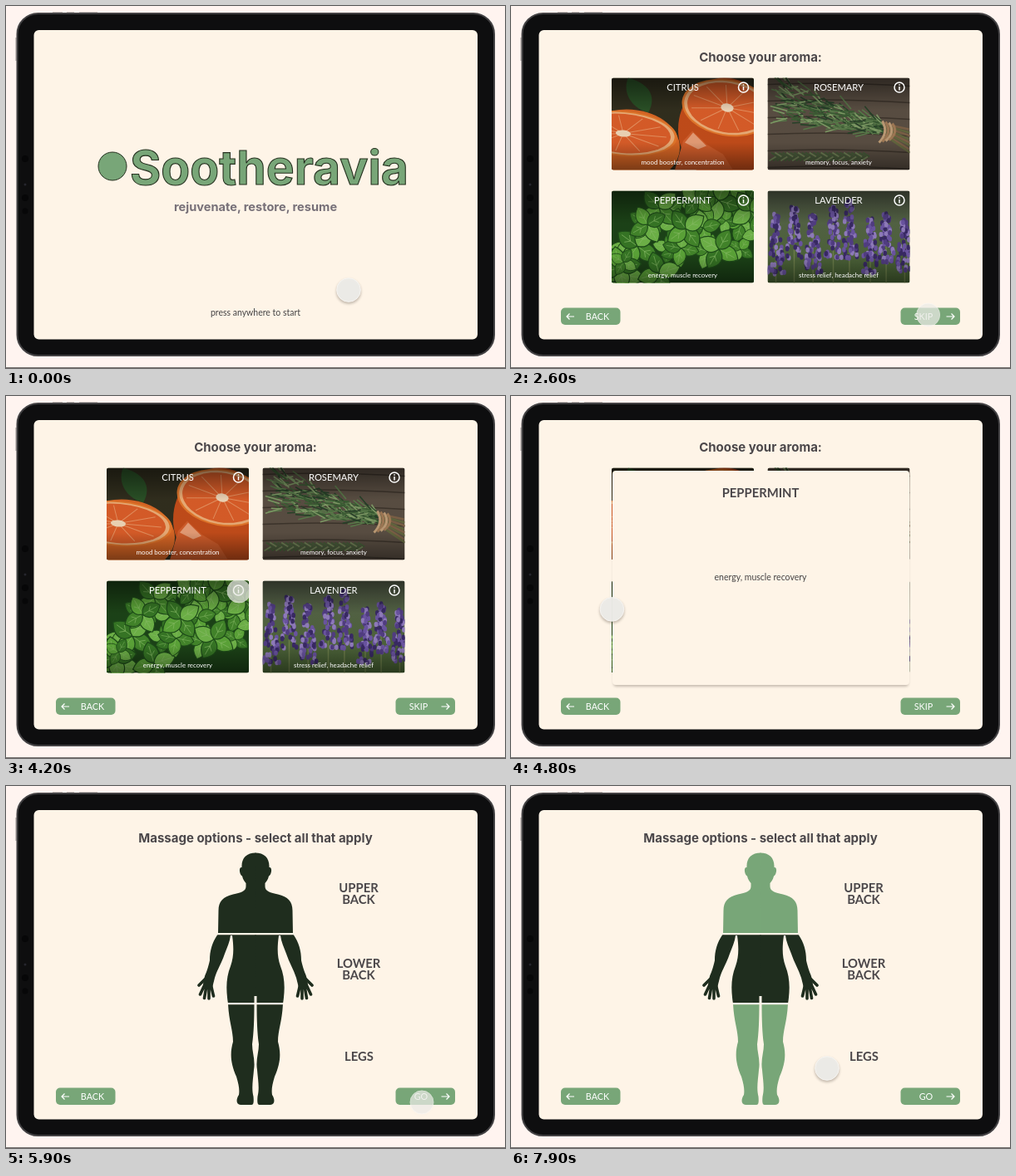
Animation, 600 px wide and 436 px high, one loop 8000 ms. Source, as an HTML page:

```html
<!DOCTYPE html>
<html lang="en">
<head>
<meta charset="utf-8">
<title>Nap pod tablet</title>
<style>
  html, body { margin: 0; width: 100%; height: 100%; overflow: hidden; background: #fff4f0; }
  svg { display: block; width: 100vw; height: 100vh; }
  text { font-family: Lato, "Open Sans", sans-serif; fill: #4b474a; }
  .title, .logo { font-family: Inter, Roboto, sans-serif; font-weight: 700; }
  .title { font-size: 15px; text-anchor: middle; }
  .tagline { font-size: 14.6px; fill: #777078; }
  .logo { font-size: 57px; fill: #78a678; stroke: #25301f; stroke-width: 1.1; }
  .body { font-size: 10.5px; fill: #454344; }
  .label { font-size: 14.8px; font-weight: 700; text-anchor: middle; }
  .light { fill: #fff; text-anchor: middle; }
  .icon { fill: none; stroke: #fef4e7; stroke-width: 2; stroke-linecap: round; stroke-linejoin: round; }
  .icon .solid { fill: #fef4e7; stroke: none; }
  .icon .cut { stroke: #78a678; stroke-width: 5; }
</style>
</head>
<body>
<svg id="stage" viewBox="0 0 600 436"></svg>
<script>
const LOOP = 8000;
const GREEN = '#78a678', DARK = '#1f2d1e', CREAM = '#fef4e7';

function seeded(seed) {
  return () => (seed = (seed * 16807) % 2147483647) / 2147483647;
}
const repeat = (n, draw) => Array.from({ length: n }, (_, i) => draw(i)).join('');
const fix = v => v.toFixed(1);

const text = (x, y, str, cls, size) =>
  `<text x="${x}" y="${y}" class="${cls}"${size ? ` font-size="${size}"` : ''}>${str}</text>`;
const lines = (x, y, rows, cls, step) =>
  rows.map((row, i) => text(x, y + i * step, row, cls)).join('');
const ellipse = (x, y, rx, ry, fill) =>
  `<ellipse cx="${fix(x)}" cy="${fix(y)}" rx="${fix(rx)}" ry="${fix(ry)}" fill="${fill}"/>`;

function button(x, label, labelX, forward) {
  const tip = forward ? 533 : 67, tail = forward ? 523.5 : 76, back = forward ? -3.5 : 3.5;
  return `<rect x="${x}" y="363.5" width="71.5" height="20.5" rx="5" fill="${GREEN}"/>
    ${text(labelX, 377.6, label, 'light', 10.8)}
    <path d="M${tail} 374H${tip}m${back} -3.5L${tip} 374l${back} 3.5" fill="none" stroke="#fff" stroke-width="1.2"/>`;
}
const backButton = button(60, 'BACK', 104, false);

// Photo stand-ins, each drawn in a 171 x 111 box
function slice(x, y, rx, ry, turn) {
  const rays = repeat(11, i => {
    const a = i * Math.PI * 2 / 11;
    return `M${x} ${y}L${fix(x + Math.cos(a) * rx * .8)} ${fix(y + Math.sin(a) * ry * .8)}`;
  });
  return `<g transform="rotate(${turn} ${x} ${y})">
    ${ellipse(x, y, rx, ry, '#ea7a2c')}${ellipse(x, y, rx * .95, ry * .94, '#f3b27a')}
    ${ellipse(x, y, rx * .88, ry * .87, '#e0602a')}
    <path d="${rays}" stroke="#ee9562" stroke-width="1"/>${ellipse(x, y, rx * .14, ry * .15, '#f7dcbc')}</g>`;
}

function citrus() {
  return `<rect width="171" height="111" fill="#33301f"/>
    <path d="M44 42C18 34 14 12 20 0C42 6 56 20 44 42Z" fill="#2c5428"/>
    ${ellipse(136, 62, 56, 62, '#c94f1b')}${ellipse(18, 84, 64, 46, '#e06a26')}
    ${slice(139, 36, 55, 34, 10)}${slice(14, 67, 65, 27, 5)}
    <path d="M76 111L86 76L97 64L114 80L134 92L146 111Z" fill="#d8602c"/>
    <path d="M88 78L98 66L114 82L104 86Z" fill="#eda27a"/>`;
}

function rosemary() {
  const rand = seeded(41);
  const planks = repeat(6, i => `<path d="M0 ${8 + i * 20}Q80 ${4 + i * 20} 171 ${10 + i * 20}" stroke="#3f362d" stroke-width="1.5" fill="none"/>`);
  const needles = repeat(260, () => {
    const d = rand(), spread = (rand() - .5) * (20 + 56 * d);
    const x = 142 - d * 122, y = 62 - d * 34 + spread * .7;
    const a = 3.5 + (rand() - .5) * 1.3, len = 10 + rand() * 12;
    const color = ['#29432a', '#3d5f35', '#5c7e4c', '#83a069'][Math.floor(rand() * 4)];
    return `<path d="M${fix(x)} ${fix(y)}l${fix(Math.cos(a) * len)} ${fix(Math.sin(a) * len)}" stroke="${color}" stroke-width="1.6"/>`;
  });
  const sprig = repeat(50, i =>
    `<path d="M${fix(10 + i * 2.3)} 95l-8 ${i % 2 ? -5 : 5}" stroke="${i % 3 ? '#456239' : '#718c58'}" stroke-width="1.5"/>`);
  const stems = repeat(8, i => `<path d="M142 ${56 + i * 2}L${170 + i % 3} ${62 + i * 4}" stroke="${i % 2 ? '#666a40' : '#806448'}" stroke-width="2.5"/>`);
  const twine = repeat(4, i => `<path d="M${134 + i * 4} ${78 - i}Q${146 + i * 4} 66 ${138 + i * 4} ${52 + i}" stroke="${i % 2 ? '#a57d58' : '#c3a079'}" stroke-width="3" fill="none"/>`);
  return `<rect width="171" height="111" fill="#5d5145"/>${planks}${sprig}${needles}${stems}${twine}`;
}

function peppermint() {
  const rand = seeded(97);
  const leaf = 'M0 0C4 -10 14 -11 22 0C14 10 4 10 0 0Z';
  const sprigs = repeat(30, i => {
    const x = (i * 47 + rand() * 24) % 178, y = 4 + rand() * 104, turn = rand() * 90;
    const scale = .8 + rand() * .55;
    const leaves = repeat(4, k => `<g transform="rotate(${k * 90})">
      <path d="${leaf}" fill="${['#458a2c', '#5faa3a', '#387a26', '#72b94a'][(k + i) % 4]}" stroke="#1f4f1a"/>
      <path d="M2 0H18M8 0l4 -4M8 0l4 4" fill="none" stroke="#8fc56c" stroke-width=".5"/></g>`);
    return `<g transform="translate(${fix(x)} ${fix(y)}) rotate(${fix(turn)}) scale(${fix(scale)})">${leaves}</g>`;
  });
  return `<rect width="171" height="111" fill="#1d4518"/>${sprigs}`;
}

function lavender() {
  const rand = seeded(13);
  const spikes = repeat(8, i => {
    const x = 10 + i * 22 + rand() * 4, top = 10 + rand() * 26, height = 58 + rand() * 18;
    const blooms = repeat(64, () => {
      const d = rand(), color = ['#3b2b68', '#554088', '#6f58a8', '#9681c4'][Math.floor(rand() * 4)];
      return ellipse(x + (rand() - .5) * (7 + 14 * d), top + d * height, 2.3, 3.2, color);
    });
    return `<path d="M${fix(x)} ${fix(top + 20)}V111" stroke="#71834e" stroke-width="1.5"/>${blooms}`;
  });
  return `<rect width="171" height="111" fill="url(#meadow)"/>${spikes}`;
}

function card(x, y, name, note, photo) {
  return `<g transform="translate(${x} ${y})"><g clip-path="url(#card)">${photo()}
    <rect width="171" height="111" fill="url(#shade)"/></g>
    ${text(85.5, 15.3, name, 'light', 11.2)}${text(85.5, 104, note, 'light', 7.9)}
    <circle cx="158.5" cy="11.5" r="6" fill="none" stroke="#fff" stroke-width="1.5"/>
    <path d="M158.5 10.6v4.4M158.5 7.7v1.6" stroke="#fff" stroke-width="1.5"/></g>`;
}

const badge = (x, y, art) =>
  `<g transform="translate(${x} ${y})"><circle r="24" fill="${GREEN}"/><g class="icon">${art}</g></g>`;
const slash = '<path class="cut" d="M-10 -13L13 10"/><path d="M-12 -11L11 12"/>';
const steam = repeat(3, i =>
  `<path d="M${i * 8 - 9} 12q-5 -5 0 -11t1 -12q6 6 2 12t-3 11Z" class="solid"/>`);

const icons = {
  voice: `<circle cx="-2" cy="-5" r="4"/><path d="M-11 11v-2q0 -5 9 -5t9 5v2ZM5 -8q3 4 0 7M9 -11q6 7 0 13"/>${slash}`,
  food: `<path d="M0 -6H12L10 11H6M5 -6V-11L9 -12M-11 3q0 -5 7 -5t7 5ZM-11 7H3M-11 11H3"/>${slash}`,
  phone: `<rect class="solid" x="-8" y="-13" width="16" height="27" rx="3"/>
    <rect x="-6" y="-9" width="12" height="17" fill="${GREEN}" stroke="none"/><circle cy="11" r="1.2" fill="${GREEN}" stroke="none"/>`,
  question: `<path d="M-10 -11H10V9H4L0 13L-4 9H-10ZM-3.5 -4q0 -4 3.5 -4t3.5 3.5q0 2 -2 3.2t-1.5 3.3M0 5v.2"/>`,
  pregnant: `<circle class="solid" cx="-1" cy="-12" r="3.4"/>
    <path class="solid" d="M-4 -7H1Q3 -6 3 -2Q7 0 6 5H2V15H-3V5H-6V-3Q-6 -7 -4 -7Z"/>`,
  scent: `${steam}<path class="cut" d="M-13 -8L14 9"/><path d="M-15 -7L14 11"/>`
};

const startPage = `
  <circle cx="128" cy="193" r="17" fill="${GREEN}" stroke="#25301f"/>
  ${text(149, 215, 'Sootheravia', 'logo')}
  ${text(300, 246.5, 'rejuvenate, restore, resume', 'title tagline')}
  <g text-anchor="middle">${text(300, 373, 'press anywhere to start', 'body')}</g>`;

const rulesPage = `
  ${text(300, 67.5, 'Things to consider beforehand', 'title')}
  ${text(300, 263, 'Disclaimer', 'title')}
  ${badge(146, 114.5, icons.voice)}${badge(332, 114.5, icons.food)}
  ${badge(146, 186.5, icons.phone)}${badge(331, 186.5, icons.question)}
  ${badge(146, 310, icons.pregnant)}${badge(332, 310, icons.scent)}
  ${lines(184, 105.5, ['Please show courtesy', 'and lower your voice.', 'People are napping.'], 'body', 11)}
  ${lines(370, 111, ['Do not bring food or', 'beverages in the pod.'], 'body', 11)}
  ${lines(184, 177.5, ['Please silence your', 'phone to avoid it', 'distracting others.'], 'body', 11)}
  ${lines(369.5, 183.5, ['For questions/problems:', 'support@dozes.example'], 'body', 11)}
  ${lines(184, 307, ['Use caution using the', 'pod if you are pregnant.'], 'body', 11)}
  ${lines(370, 301, ['Do not use the aroma setting', 'if you are sensitive/allergies to', 'essential oils or strong scents.'], 'body', 11)}
  ${backButton}${button(468.5, 'GO', 499, true)}`;

const infoPanel = `<g id="info">
  <rect x="123" y="93" width="355" height="257" rx="4" fill="#4a3d33" opacity=".3" filter="url(#soft)"/>
  <rect x="122" y="90" width="357" height="258" rx="4" fill="${CREAM}"/>
  ${text(300, 122, 'PEPPERMINT', 'label')}
  <g text-anchor="middle">${text(300, 222, 'energy, muscle recovery', 'body')}</g></g>`;

const aromaPage = `
  ${text(300, 67, 'Choose your aroma:', 'title')}
  ${card(121, 86.5, 'CITRUS', 'mood booster, concentration', citrus)}
  ${card(308.5, 86.5, 'ROSEMARY', 'memory, focus, anxiety', rosemary)}
  ${card(121, 222.5, 'PEPPERMINT', 'energy, muscle recovery', peppermint)}
  ${card(308.5, 222.5, 'LAVENDER', 'stress relief, headache relief', lavender)}
  ${backButton}${button(468.5, 'SKIP', 496, true)}${infoPanel}`;

const halfBody = `<g id="half">
  <path fill="currentColor" d="M300.5 80.5C289 80.5 283 87 283.5 98C279.5 97 280.5 107 284 108.5C285 113 287 115 288.5 117V121
    C288.5 127 282 128.5 273 130.5C261 133.5 255.5 139 255.5 150L255 178C248 188 245 198 245 210
    C243 219 241 224 239 229L237 239L248 243L251 231C254 221 260 212 263 202C266 194 269 188 270 180H272
    C274 195 274 206 270 217C265 230 264 243 267 262C268 284 273 294 273 308C269 322 270 334 277 350
    C280 360 281 366 280 372C276 378 277 384 282 384H295C298 384 298 380 297.5 374C295 364 297 354 298 342
    C300 330 296 321 296 311C298 298 298.5 280 298.5 262V253H300.5Z"/>
  <path fill="none" stroke="currentColor" stroke-width="3.6" stroke-linecap="round"
    d="M241 231L232 240M240 237L233.5 251M241.5 238L238.5 255.5M244 238L244 256M246 238L249.5 253"/></g>`;
const part = id => `<g id="${id}" clip-path="url(#${id}Clip)"><use href="#whole"/></g>`;

const massagePage = `
  ${text(300, 67.5, 'Massage options - select all that apply', 'title')}
  ${part('upper')}${part('middle')}${part('legs')}
  ${lines(424, 128, ['UPPER', 'BACK'], 'label', 14)}
  ${lines(424, 219, ['LOWER', 'BACK'], 'label', 14)}
  ${text(424.5, 330.5, 'LEGS', 'label')}
  ${backButton}${button(468.5, 'GO', 499, true)}`;

const pages = [startPage, rulesPage, aromaPage, massagePage];
const band = (id, y, h) => `<clipPath id="${id}Clip"><rect x="200" y="${y}" width="200" height="${h}"/></clipPath>`;

document.getElementById('stage').innerHTML = `
  <defs>
    <clipPath id="screen"><rect x="33.5" y="29" width="533.5" height="372.5" rx="6"/></clipPath>
    <clipPath id="card"><rect width="171" height="111" rx="2.5"/></clipPath>
    ${band('upper', 70, 107)}${band('middle', 179.3, 81.7)}${band('legs', 263.3, 130)}
    <linearGradient id="shade" x2="0" y2="1">
      <stop offset="0" stop-opacity=".5"/><stop offset=".35" stop-opacity=".06"/>
      <stop offset=".7" stop-opacity=".06"/><stop offset="1" stop-opacity=".45"/>
    </linearGradient>
    <linearGradient id="meadow" x2="0" y2="1">
      <stop offset="0" stop-color="#5c6650"/><stop offset="1" stop-color="#4b6735"/>
    </linearGradient>
    <filter id="soft" x="-50%" y="-50%" width="200%" height="200%"><feGaussianBlur stdDeviation="1.6"/></filter>
    ${halfBody}
    <g id="whole"><use href="#half"/><use href="#half" transform="translate(600) scale(-1 1)"/></g>
  </defs>
  <rect width="600" height="436" fill="#fff4f0"/>
  <path d="M0 435.5H600" stroke="#77716f"/>
  <path d="M56 8H68M73 8H82M88 8H110" stroke="#8f8886"/>
  <path d="M12 38V66" stroke="#9a9391"/>
  <rect x="13.5" y="9" width="573.5" height="412" rx="25" fill="#0e0e0f" stroke="#424143" stroke-width="2"/>
  <g fill="#070708"><circle cx="23" cy="184" r="4"/><circle cx="23" cy="231" r="4"/><circle cx="23" cy="247" r="3.5"/></g>
  <circle cx="23" cy="215" r="1.5" fill="#26262d"/>
  <g clip-path="url(#screen)">
    ${pages.map((art, i) => `<g id="page${i}"><rect x="33" y="28" width="535" height="375" fill="${CREAM}"/>${art}</g>`).join('')}
  </g>
  <g id="pointer">
    <circle id="shadow" cy="2" r="15" fill="#4a3d33" filter="url(#soft)"/>
    <circle id="disc" fill="#edece8" stroke="#f8f6f3"/>
  </g>`;

// time, x, y
const path = [
  [0, 412, 342], [1100, 412, 342], [1500, 410, 344], [1850, 410, 344], [2250, 501, 372], [2850, 502, 372],
  [3200, 495, 364], [3450, 478, 346], [4050, 280, 235], [4450, 280, 235], [4900, 99, 260], [5150, 99, 260],
  [5400, 118, 258], [5750, 500, 381], [5950, 500, 381], [6250, 404, 260], [6700, 316, 149], [6950, 316, 149],
  [7250, 303, 325], [7550, 303, 325], [7900, 380, 340], [LOOP, 380, 340]
];
// While touching, the pointer turns translucent and loses its shadow
const touches = [[750, 950], [2200, 3300], [4000, 4400], [4950, 5100], [5720, 5900], [6600, 7550]];
const pageStarts = [0, 1000, 2500, 5900];
const infoOpen = [4400, 5100];
const picked = { upper: 6900, middle: LOOP, legs: 7400 };

const ramp = (t, start, length) => Math.min(1, Math.max(0, (t - start) / length));
const ease = p => p * p * (3 - 2 * p);
const byId = id => document.getElementById(id);
const show = (id, visible) => byId(id).setAttribute('display', visible ? 'inline' : 'none');

function pointerAt(t) {
  const next = path.findIndex(key => key[0] > t);
  const [t0, x0, y0] = path[next - 1], [t1, x1, y1] = path[next];
  const p = ease((t - t0) / (t1 - t0));
  return [x0 + (x1 - x0) * p, y0 + (y1 - y0) * p];
}

function render(t) {
  pageStarts.forEach((start, i) => show('page' + i, t >= start && t < (pageStarts[i + 1] ?? LOOP)));
  show('info', t >= infoOpen[0] && t < infoOpen[1]);
  for (const id in picked) byId(id).style.color = t >= picked[id] ? GREEN : DARK;

  const touch = Math.max(...touches.map(([a, b]) => ramp(t, a, 100) * (1 - ramp(t, b, 100))));
  byId('pointer').setAttribute('transform', `translate(${pointerAt(t)})`);
  byId('shadow').setAttribute('opacity', .3 * (1 - touch));
  byId('disc').setAttribute('opacity', .97 - .25 * touch);
  byId('disc').setAttribute('r', 14.3 - .3 * touch);
}

function tick(now) {
  render(now % LOOP);
  requestAnimationFrame(tick);
}
render(0);
requestAnimationFrame(tick);
</script>
</body>
</html>
```
